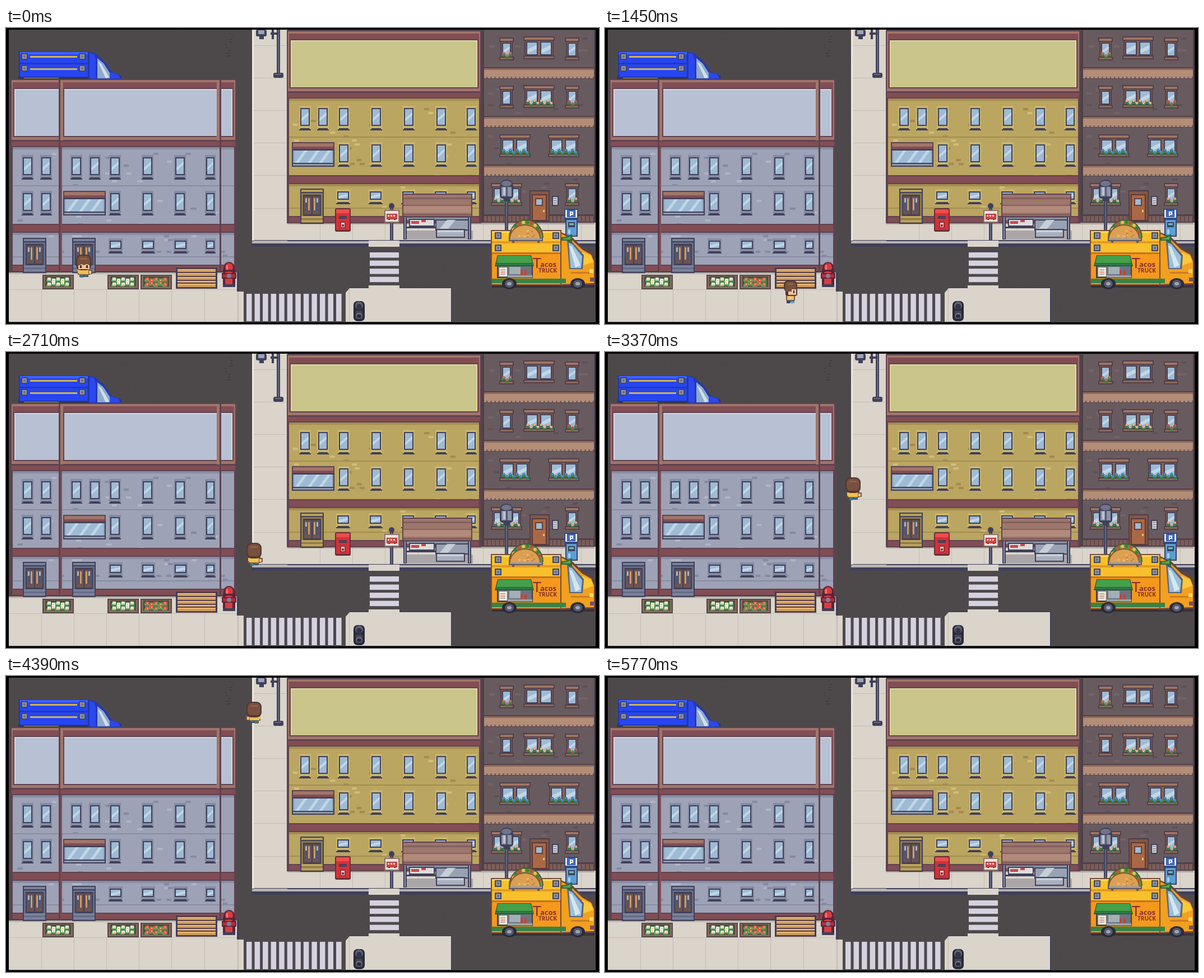
These frames come from a looping animation (1058x529 px, 7700 ms). An HTML page with a canvas:

```html
<!DOCTYPE html>
<html lang="en">
<head>
<meta charset="utf-8">
<title>Street walk</title>
<style>
html, body { margin: 0; width: 100%; height: 100%; overflow: hidden; background: #000; }
canvas { display: block; }
</style>
</head>
<body>
<canvas id="stage" width="1058" height="529"></canvas>
<script>
const stage = document.getElementById('stage').getContext('2d');
const street = document.createElement('canvas');
street.width = 1058;
street.height = 529;
let g = street.getContext('2d');

const INK = '#40405a', RED = '#824d55', RED_DARK = '#5f4250', TRIM = '#a0756a';
const GLASS = '#9fbad4', SHINE = '#c1d7e6', PAVE = '#dad4cb', SEAM = '#c2bcb5';

let seed = 7;
const rnd = () => (seed = seed * 16807 % 2147483647) / 2147483647;

const r = (c, x, y, w, h) => { g.fillStyle = c; g.fillRect(x, y, w, h); };
const box = (c, x, y, w, h, line = INK, t = 2) => {
  r(line, x, y, w, h);
  r(c, x + t, y + t, w - 2 * t, h - 2 * t);
};
const poly = (c, ...p) => {
  g.fillStyle = c;
  g.beginPath();
  for (let i = 0; i < p.length; i += 2) g.lineTo(p[i], p[i + 1]);
  g.fill();
};
const disc = (c, x, y, rx, ry = rx, from = 0, to = 2 * Math.PI) => {
  g.fillStyle = c;
  g.beginPath();
  g.ellipse(x, y, rx, ry, 0, from, to);
  g.fill();
};
const dome = (c, x, y, rx, ry) => disc(c, x, y, rx, ry, Math.PI, 2 * Math.PI);
const round = (c, x, y, w, h, rad) => {
  g.fillStyle = c;
  g.beginPath();
  g.roundRect(x, y, w, h, rad);
  g.fill();
};

function glass(x, y, w, h) {
  r(GLASS, x, y, w, h);
  const s = Math.min(w, h) * .4;
  poly(SHINE, x + w, y + h * .2, x + w, y + h * .2 + s, x, y + h * .6 + s, x, y + h * .6);
}

function win(x, y, w, h, trim) {
  r(trim, x, y, w, h - 2);
  r(INK, x + 2, y + 4, w - 4, h - 6);
  glass(x + 4, y + 6, w - 8, h - 16);
  r(trim, x + 2, y + h - 8, w - 4, 4);
  r(INK, x, y + h - 2, w, 2);
}

function shopWindow(x, y) {
  box(TRIM, x, y, 76, 13, RED_DARK);
  r(RED, x + 2, y + 8, 72, 4);
  box('#8d9ab2', x, y + 13, 76, 31);
  r(GLASS, x + 4, y + 15, 68, 22);
  for (const dx of [8, 30, 50])
    poly(SHINE, x + dx + 14, y + 15, x + dx + 20, y + 15, x + dx + 4, y + 37, x + dx - 2, y + 37);
  r(INK, x + 2, y + 37, 72, 2);
}

function door(x, y, trim, dark) {
  box(dark, x, y + 4, 42, 59);
  box(trim, x, y, 42, 8);
  r(INK, x + 5, y + 11, 32, 38);
  for (const dx of [7, 22]) {
    r('#70534f', x + dx, y + 14, 13, 32);
    r('#4e566f', x + dx + 2, y + 16, 9, 24);
    r('#d09a61', x + dx + (dx > 9 ? 2 : 7), y + 17, 3, 22);
    r('#a9b4c0', x + dx + (dx > 9 ? 7 : 2), y + 17, 3, 8);
  }
  r(trim, x + 2, y + 49, 38, 4);
  r(trim, x + 2, y + 56, 38, 4);
}

function bricks(x, y, w, h, count, colors) {
  for (let i = 0; i < count; i++)
    r(colors[i % 2], x + rnd() * (w - 12), y + Math.floor(rnd() * h / 7) * 7, 9, 4);
}

// Billboard roof with its red cornice
function roof(x, y, w, panel, light) {
  box(TRIM, x, y, w, 111, RED_DARK);
  r(RED, x + 4, y + 6, w - 8, 98);
  r(RED_DARK, x + 6, y + 16, w - 12, 88);
  r(light, x + 7, y + 18, w - 14, 84);
  r(panel, x + 9, y + 20, w - 18, 82);
  box(RED, x, y + 110, w, 12, RED_DARK);
}

function wall(x, y, w, bottom, c, shade, tones) {
  r(c, x, y, w, bottom - y);
  bricks(x + 8, y + 10, w - 16, bottom - y - 25, w / 9, tones);
  r(shade, x, y + 68, w, 2);
  r(shade, x, y, w, 4);
  box(RED, x, y + 137, w, 16, RED_DARK);
  r(shade, x, y + 153, w, 4);
  r(shade, x, bottom - 28, w, 2);
  box(RED, x, bottom - 13, w, 13, RED_DARK);
  for (const side of [x, x + w - 4]) r(RED_DARK, side, y, 4, bottom - y);
}

function grayBuilding() {
  const trim = '#858ba4', shade = '#878da5';
  wall(8, 213, 403, 436, '#9da2b6', shade, ['#858ba0', '#b0b5c5']);
  roof(8, 91, 403, '#b8c1d3', '#d0d6e1');
  for (const [edge, side] of [[94, 97], [381, 376]]) {
    r(TRIM, side, 93, 5, 108);
    r(RED_DARK, edge, 92, 3, 344);
  }
  r(RED_DARK, 102, 108, 2, 86);
  r(RED, 97, 213, 3, 222);
  for (const x of [28, 61, 115, 148, 184, 242, 300, 355]) {
    const w = x === 355 ? 19 : 21;
    win(x, 227, w, 44, trim);
    if (x !== 115 && x !== 148) win(x, 291, w, 44, trim);
  }
  shopWindow(102, 291);
  for (const x of [183, 241, 299, 355]) win(x, 376, x === 355 ? 19 : 25, 27, trim);
  door(30, 375, '#7b829b', '#646c86');
  door(118, 375, '#7b829b', '#646c86');
}

function yellowBuilding() {
  const trim = '#c9b56c', shade = '#a38d50';
  wall(501, 126, 347, 349, '#baa561', shade, ['#a58a51', '#d0bd78']);
  roof(501, 4, 347, '#cac58b', '#dfd99f');
  for (const x of [523, 555, 592, 650, 708, 766, 820]) {
    const w = x === 820 ? 20 : 21;
    win(x, 139, w, 44, trim);
    if (x > 560) {
      win(x, 204, w, 44, trim);
      win(x === 820 ? x : x - 3, 288, x === 820 ? 20 : 25, 27, trim);
    }
  }
  shopWindow(510, 204);
  door(525, 287, '#b9a25b', '#8f7944');
}

function flowers(x, y, w, color) {
  for (let i = 0; i < w / 6; i++) {
    const fx = x + i * 6, fy = y - 2 + i % 2 * 4;
    r('#3d7d4b', fx - 1, fy + 2, 6, 6);
    r(color, fx, fy, 4, 4);
  }
}

function sillWindow(x, y, wide, color) {
  const w = wide ? 56 : 26;
  box('#8a6456', x + 2, y, w - 4, 40, '#51404a');
  box('#a07562', x, y, w, 8, '#51404a');
  for (const dx of wide ? [5, 30] : [5]) {
    const gw = wide ? 21 : 16;
    r(INK, x + dx, y + 9, gw, 25);
    glass(x + dx + 2, y + 11, gw - 4, 21);
  }
  box('#8f6858', x, y + 34, w, 7, '#51404a');
  if (color) flowers(x + 6, y + 28, w - 12, color);
}

function brownBuilding() {
  r('#685b60', 850, 4, 202, 344);
  bricks(856, 10, 190, 320, 40, ['#5c5158', '#736467']);
  for (const y of [70, 157, 244]) {
    r('#51404a', 852, y, 199, 2);
    r('#8f6a5c', 852, y + 2, 199, 4);
    r('#b48d77', 852, y + 5, 199, 12);
    for (let x = 852; x < 1050; x += 7.3) {
      r('#b48d77', x, y + 17, 5, 3);
      r('#51404a', x, y + 20, 7, 1);
    }
  }
  r('#51404a', 852, 333, 199, 15);
  for (let x = 852; x < 1050; x += 7.3) r('#7c5d58', x, 336, 6, 10);
  r('#4d4049', 849, 4, 4, 344);
  r('#4d4049', 1049, 4, 3, 344);
  sillWindow(880, 17, 0, '#d26759');
  sillWindow(923, 15, 1);
  sillWindow(997, 17, 0);
  sillWindow(880, 103, 0);
  sillWindow(923, 102, 1, '#e5ad92');
  sillWindow(997, 103, 0, '#d34d4e');
  sillWindow(880, 190, 1, '#4d87c9');
  sillWindow(967, 190, 1, '#4d87c9');
  sillWindow(865, 277, 1, '#e5ad92');
  sillWindow(997, 277, 0, '#e3a083');
  box('#815947', 934, 290, 36, 56, '#503d44');
  box('#ab6845', 938, 297, 27, 48, '#59383c');
  box(GLASS, 944, 304, 14, 14, '#60413f');
  r('#e8bd65', 958, 325, 3, 4);
  box('#cbcbd0', 974, 300, 12, 18);
  for (let y = 304; y < 315; y += 4) r('#77798a', 977, y, 6, 1);
}

function ground() {
  r('#4d494b', 5, 3, 1047, 523);
  for (let i = 0; i < 900; i++)
    r(i % 2 ? '#504c4e' : '#4a4648', 5 + rnd() * 1045, 3 + rnd() * 520, 3, 2);
  for (let i = 0; i < 9; i++) r('#413d41', 390 + rnd() * 18, 9 + i * 5, 2 + rnd() * 5, 2);

  r(PAVE, 439, 3, 63, 377);
  r(PAVE, 439, 348, 613, 32);
  r(INK, 438, 379, 614, 12);
  r('#b9b4b2', 439, 381, 613, 4);
  r('#ebe7dd', 439, 3, 3, 377);
  for (let y = 30.5; y < 380; y += 58.2) r(SEAM, 442, Math.round(y), 60, 1);
  for (let x = 560; x < 1050; x += 58.2) r(SEAM, Math.round(x), 348, 1, 31);
  r('#aaa5a1', 502, 348, 548, 3);

  r(PAVE, 5, 437, 408, 88);
  r('#bdb8b2', 5, 437, 408, 3);
  r(SEAM, 5, 467, 408, 1);
  for (let x = 62.5; x < 412; x += 58.2) r(SEAM, Math.round(x), 467, 1, 58);
  r(INK, 412, 437, 4, 34);
  r(PAVE, 411, 471, 13, 54);
  r(SEAM, 413, 471, 2, 54);

  r(INK, 612, 463, 184, 63);
  poly(PAVE, 606, 473, 613, 465, 794, 465, 794, 525, 606, 525);
  r(SEAM, 612, 466, 1, 59);
  for (let i = 0; i < 12; i++) r('#d6d1df', 429 + i * 14.55, 475, 9.5, 49);

  r(PAVE, 647, 380, 55, 11);
  r(PAVE, 647, 460, 55, 6);
  for (let i = 0; i < 4; i++) r('#d6d1df', 649, 401 + i * 14.55, 52, 9.5);
}

function flowerBox(x, color) {
  box('#8a695d', x, 441, 56, 26, '#574549');
  r('#4d4a44', x + 5, 444, 46, 18);
  r('#3f7c4b', x + 8, 447, 41, 14);
  for (let i = 0; i < 10; i++) {
    const fx = x + 9 + i % 5 * 8, fy = 446 + (i > 4) * 7 + i % 2 * 2;
    r('#5da45e', fx - 2, fy + 3, 8, 4);
    r(color, fx, fy, 6, 5);
    r('#e9b967', fx + 2, fy + 2, 2, 2);
  }
}

function bench() {
  r('#594049', 303, 428, 74, 38);
  for (const [y, h] of [[431, 5], [438, 5], [445, 5], [452, 3], [457, 6]]) {
    r('#cf9a5c', 306, y, 68, h);
    r('#eabd7b', 306, y, 68, 2);
  }
  r(INK, 303, 428, 3, 38);
  r(INK, 374, 428, 3, 38);
}

function hydrant() {
  round('#5c2436', 387, 429, 22, 34, 4);
  disc('#5c2436', 398, 428, 10, 10);
  disc('#d83c43', 398, 428, 7, 8);
  r('#d83c43', 391, 436, 13, 23);
  r('#f0786d', 393, 424, 3, 11);
  r('#5c2436', 387, 432, 22, 3);
  box('#ad2f40', 385, 438, 26, 10, '#5c2436');
  disc('#817f96', 398, 443, 4);
  r(INK, 387, 458, 22, 5);
}

function lamp(x, top, bottom) {
  r(INK, x - 3, top, 6, bottom - top);
  r('#686c82', x - 1, top, 2, bottom - top);
}

function streetLamps() {
  lamp(486, 3, 86);
  round(INK, 477, 80, 18, 9, 3);
  r('#676a7e', 480, 82, 11, 2);
  r(INK, 472, 8, 14, 4);
  r(INK, 474, 3, 4, 17);
  round(INK, 446, 3, 19, 12, 3);
  r('#9ba3b6', 450, 4, 11, 7);
  r(INK, 452, 14, 8, 6);

  lamp(893, 305, 362);
  round(INK, 881, 277, 24, 28, 5);
  disc(INK, 893, 279, 11, 8);
  disc('#70758b', 893, 278, 9, 5);
  r('#8d94a8', 884, 284, 18, 17);
  r('#bdc4cf', 887, 285, 4, 14);
  r('#565a72', 892, 284, 3, 17);
  r(INK, 888, 304, 11, 6);
}

function busStop() {
  r('#aaa6a8', 715, 362, 118, 16);
  r('#8d93a6', 711, 339, 118, 4);
  box('#99a2b3', 766, 342, 60, 20);
  poly('#c6cfd8', 787, 343, 802, 343, 787, 361, 772, 361);
  box('#dcdcdc', 719, 341, 46, 14);
  r('#c84b4c', 723, 345, 14, 5);
  r('#c84b4c', 741, 343, 8, 4);
  r(INK, 714, 355, 52, 3);
  box('#a8b0bf', 767, 359, 52, 16);
  r('#cad1db', 770, 362, 46, 3);
  for (const x of [709, 824]) {
    r(INK, x, 335, 6, 43);
    r('#8f95a8', x + 2, 338, 2, 39);
  }
  box('#9e776c', 707, 296, 125, 42, RED_DARK);
  r('#82605c', 709, 303, 121, 3);
  r('#b18a7b', 709, 318, 121, 12);
  r('#82605c', 709, 316, 121, 2);
  r('#82605c', 709, 332, 121, 3);

  lamp(688, 316, 379);
  disc(INK, 688, 318, 5);
  box('#e8e3dc', 675, 325, 27, 23, '#8d716b');
  box('#d74742', 679, 332, 19, 10, '#982f3a', 1);
  for (const x of [681, 686, 691]) r('#f0d7ce', x, 334, 3, 3);
  r(INK, 682, 341, 3, 2);
  r(INK, 692, 341, 3, 2);
}

function mailbox() {
  round('#692d37', 587, 322, 28, 42, 3);
  r('#d63038', 589, 325, 24, 36);
  r('#ea4d4b', 589, 324, 24, 7);
  box('#9c303b', 594, 336, 14, 5);
  box('#e8ded7', 596, 346, 10, 12, '#942e39');
  r('#942e39', 599, 351, 4, 4);
}

function parkingMeter() {
  box('#5b9ed6', 998, 341, 22, 32);
  box('#e0e8ef', 996, 323, 25, 18, '#314d87');
  box('#446cc3', 1001, 325, 15, 13, '#314d87', 1);
  r('#fff', 1006, 328, 2, 8);
  box('#446cc3', 1006, 328, 6, 6, '#fff', 2);
  box('#345b7a', 1003, 347, 12, 9);
  r('#74c0bd', 1005, 349, 8, 3);
  r('#a8d0ec', 1003, 360, 4, 8);
}

function trafficLight() {
  round('#292a38', 620, 488, 20, 36, 7);
  disc('#60647a', 630, 496, 7);
  disc('#343648', 630, 498, 5);
  r('#424457', 624, 505, 12, 15);
  disc('#66697d', 630, 514, 6, 5);
  disc('#292a38', 630, 515, 4, 3);
}

const vent = (x, y) => {
  box('#8f92a8', x, y, 12, 12, '#41465f');
  r('#6d728c', x + 4, y + 4, 4, 4);
};

function blueTruck() {
  r('#303348', 22, 85, 184, 7);
  r('#b7a13d', 32, 86, 62, 4);
  poly('#2339b4', 147, 43, 158, 44, 177, 61, 189, 79, 203, 83, 206, 91, 147, 91);
  poly('#2b48f0', 149, 45, 157, 46, 160, 57, 160, 90, 149, 90);
  poly('#8fa9cb', 163, 54, 174, 63, 185, 80, 185, 90, 163, 90);
  poly('#d0dfea', 164, 60, 170, 64, 184, 88, 178, 90);
  poly('#2b48f0', 185, 79, 200, 83, 204, 90, 185, 90);
  box('#2746f2', 23, 42, 125, 47, '#2337a4');
  r('#3f63ff', 25, 43, 121, 4);
  r('#2138c4', 25, 62, 121, 3);
  for (const y of [50, 72]) r('#d3b350', 43, y, 84, 3);
  for (const x of [27, 130]) { vent(x, 45); vent(x, 66); }
}

function tacoTruck() {
  r('#37323c', 867, 455, 183, 9);
  poly('#6a423d', 988, 364, 1009, 373, 1030, 393, 1046, 402, 1052, 416, 1051, 459, 988, 461);
  poly('#f2a01f', 990, 367, 1007, 376, 1028, 396, 1044, 405, 1049, 417, 1049, 456, 990, 458);
  poly('#fbc838', 1028, 400, 1044, 407, 1048, 418, 1028, 425);
  poly('#5a647c', 1001, 380, 1010, 382, 1031, 406, 1029, 431, 1005, 431);
  poly('#9dbfda', 1004, 384, 1010, 386, 1028, 408, 1026, 429, 1007, 429);
  poly('#d5e7ee', 1005, 389, 1010, 391, 1025, 424, 1016, 428);
  r('#cd7b25', 1008, 436, 36, 3);
  r('#ffd65c', 1041, 431, 7, 7);
  r('#77515b', 1042, 446, 8, 7);
  box('#f5981c', 865, 361, 126, 99, '#754b34');
  r('#f9c02b', 867, 363, 122, 38);
  r('#ffda5a', 867, 363, 122, 3);
  r('#e39a25', 867, 381, 122, 4);
  r('#bf7425', 867, 401, 122, 3);
  r('#398345', 867, 448, 132, 8);
  for (const x of [872, 975]) { vent(x, 365); vent(x, 387); }

  box('#6b7580', 876, 423, 64, 24, '#443943');
  r('#a3afb6', 898, 427, 20, 13);
  box('#efebdb', 879, 427, 16, 18, '#796a65', 1);
  for (let y = 431; y < 443; y += 3) r(y === 437 ? '#d04c43' : '#8d8786', 882, y, 9, 1);
  for (const x of [918, 925]) r('#c84036', x, 433, 4, 10);
  r('#9aa1a8', 895, 442, 44, 4);
  poly('#285d3e', 877, 406, 937, 406, 942, 426, 872, 426);
  poly('#45a04a', 878, 407, 936, 407, 939, 420, 875, 420);
  r('#2f7a44', 874, 421, 66, 3);

  g.fillStyle = '#872e2e';
  g.font = '24px "DejaVu Sans", sans-serif';
  g.fillText('T', 940, 429);
  g.font = 'bold 13px "Noto Sans", sans-serif';
  g.fillText('acos', 953, 427);
  g.font = 'bold 10px "Noto Sans", sans-serif';
  g.fillText('TRUCK', 950, 437);

  for (const x of [898, 1020]) {
    disc('#282a38', x, 457, 13, 10);
    disc('#55596d', x, 457, 8, 7);
    disc('#a0a5b0', x, 457, 4, 3);
  }

  box('#9b9ca5', 897, 374, 61, 7, '#5d5960');
  r('#5d5960', 903, 380, 4, 4);
  r('#5d5960', 948, 380, 4, 4);
  dome('#4d5636', 928, 375, 31, 33);
  dome('#5f9c42', 928, 375, 29, 31);
  for (let i = 0; i < 10; i++) {
    const a = Math.PI * (1.08 + i * .09);
    disc(['#cc4939', '#e8c04c', '#407f3c'][i % 3], 928 + 26 * Math.cos(a), 374 + 27 * Math.sin(a), 3);
  }
  dome('#8b5633', 926, 376, 28, 25);
  dome('#dda052', 926, 376, 26, 23);
  for (let i = 0; i < 12; i++) r(i % 2 ? '#f2c579' : '#bd7c3c', 908 + rnd() * 36, 361 + rnd() * 12, 3, 2);
  poly('#2d6845', 991, 374, 1000, 373, 1010, 368, 1010, 385, 1000, 380, 991, 380);
  poly('#58a751', 993, 376, 1001, 375, 1007, 372, 1007, 378, 993, 378);
}

function drawStreet() {
  r('#000', 0, 0, 1058, 529);
  ground();
  blueTruck();
  grayBuilding();
  yellowBuilding();
  brownBuilding();
  for (const [x, c] of [[65, '#eeeae1'], [181, '#eeeae1'], [240, '#e65843']]) flowerBox(x, c);
  bench();
  hydrant();
  streetLamps();
  mailbox();
  busStop();
  parkingMeter();
  tacoTruck();
  trafficLight();
  r('#000', 1052, 0, 6, 529);
  r('#000', 0, 526, 1058, 3);
}

const HAIR = '#77503f', HAIR_DARK = '#513733', HAIR_LIGHT = '#8e6248';
const SKIN = '#f2c09a', SHIRT = '#efc24c', PANTS = '#42758f';

// Drawn around the middle of the feet; phase is one of six walking poses
function person(x, y, dx, dy, phase) {
  g.save();
  g.translate(Math.round(x), Math.round(y));
  if (dx < 0) g.scale(-1, 1);
  const bob = phase % 3 ? 0 : 2;
  const side = phase > 0 && phase < 4 ? 1 : -1;
  if (dx) {
    const stride = [0, 6, 2][phase % 3];
    r('#365d7b', -5 - stride, -7, 7, 6);
    r(PANTS, -2 + stride, -7, 7, 6);
    r(INK, -5 - stride, -3, 6, 3);
    r('#68a6c1', -2 + stride, -3, 7, 3);
    r('#81553f', -8, -16, 16, 11);
    r(SHIRT, -6, -15, 12, 9);
    r(SKIN, -2 + stride * side / 2, -14, 4, 8);
    round(HAIR_DARK, -12, -41 + bob, 24, 21, 8);
    round(HAIR_DARK, -9, -27 + bob, 21, 14, 4);
    round(HAIR, -10, -39 + bob, 20, 19, 7);
    r(HAIR_LIGHT, -5, -36 + bob, 10, 3);
    r(SKIN, -4, -25 + bob, 14, 10);
    r(HAIR, -4, -25 + bob, 6, 4);
    r('#3a2c32', 5, -23 + bob, 2, 5);
  } else {
    r('#315773', -8, -7, 16, 6);
    r(PANTS, -7, -7, 6, side > 0 ? 7 : 4);
    r(PANTS, 1, -7, 6, side > 0 ? 4 : 7);
    r('#81553f', -11, -16, 22, 11);
    r(SHIRT, -9, -15, 18, 9);
    r('#81553f', side > 0 ? 8 : -15, -14, 7, 8);
    r(SKIN, side > 0 ? 9 : -13, -12, 4, 5);
    r(SHIRT, side > 0 ? -11 : 7, -14, 4, 6);
    round(HAIR_DARK, -14, -41 + bob, 27, 28, 9);
    round(HAIR, -12, -39 + bob, 23, 23, 8);
    r(HAIR_LIGHT, -7, -35 + bob, 13, 3);
    if (dy > 0) {
      r(SKIN, -10, -26 + bob, 20, 11);
      poly(HAIR, -10, -27, 10, -27, 10, -22, 5, -24, 0, -22, -4, -24, -10, -21);
      r('#3a2c32', -7, -22 + bob, 3, 5);
      r('#3a2c32', 4, -22 + bob, 3, 5);
    } else {
      r(HAIR_DARK, -9, -17 + bob, 18, 3);
    }
  }
  g.restore();
}

// Step, x, y
const route = [
  [0, 138.5, 446], [4.75, 138.5, 492], [33.6, 443, 492], [72, 443, 85],
  [72.4, 443, 76], [92, 236.5, 76], [94, 236.5, 98]
];

function walker(step) {
  const i = Math.max(1, route.findIndex(p => p[0] >= step));
  const [s0, x0, y0] = route[i - 1], [s1, x1, y1] = route[i];
  const k = (step - s0) / (s1 - s0);
  person(x0 + (x1 - x0) * k, y0 + (y1 - y0) * k, x1 - x0, y1 - y0, step ? step % 6 : 1);
}

function draw(now) {
  const step = Math.max(0, Math.floor((now % 7700 - 70) / 60));
  g.drawImage(street, 0, 0);
  if (step < 95) walker(step);
  requestAnimationFrame(draw);
}

drawStreet();
g = stage;
draw(0);
</script>
</body>
</html>
```
